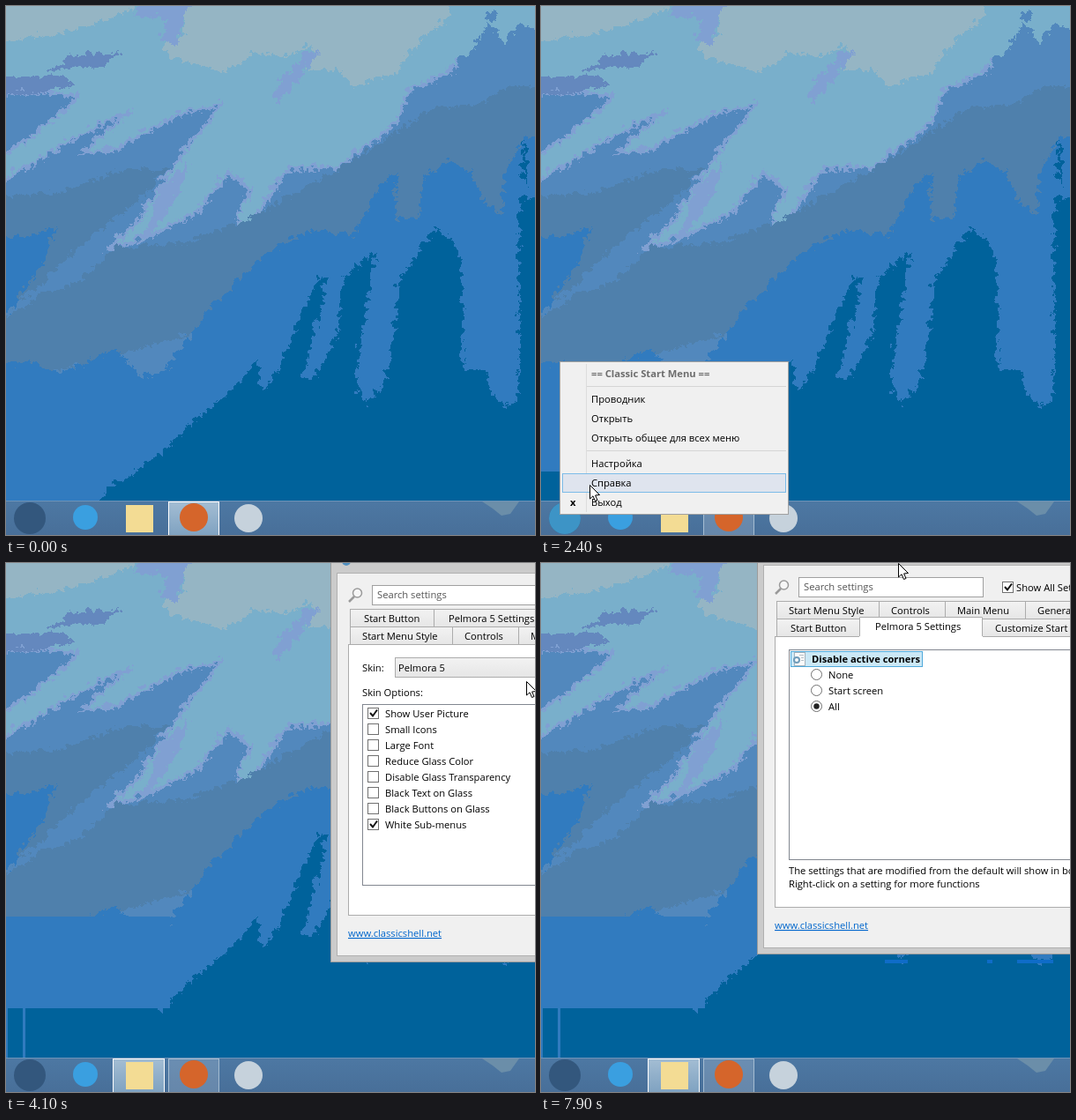
These frames come from a looping animation (600 px wide and 600 px high, 8 s). An HTML page:

```html
<!DOCTYPE html>
<html lang="ru">
<head>
<meta charset="utf-8">
<title>Start menu settings</title>
<style>
  html, body { margin: 0; width: 100%; height: 100%; overflow: hidden; background: #00629b; }
  svg { position: absolute; left: 0; top: 0; width: 600px; height: 600px; }
  #wallpaper { will-change: transform; }
  text { font: 11.2px "Open Sans", "Noto Sans", sans-serif; white-space: pre; }
  .bold { font-weight: bold; }
  .hint { font-size: 12px; font-style: italic; }
</style>
</head>
<body>
<svg id="wallpaper" viewBox="0 0 600 600"></svg>
<svg id="screen" viewBox="0 0 600 600"></svg>
<script>
const LOOP = 8000, STEP = 100;

// Markup helpers
const poly = (fill, points, extra = '') => `<polygon points="${points}" fill="${fill}" ${extra}/>`;
const block = (x, y, w, h, fill, extra = '') => `<rect x="${x}" y="${y}" width="${w}" height="${h}" fill="${fill}" ${extra}/>`;
const box = (x, y, w, h, fill, stroke) => block(x + .5, y + .5, w - 1, h - 1, fill, `stroke="${stroke}"`);
const disc = (x, y, r, fill, extra = '') => `<circle cx="${x}" cy="${y}" r="${r}" fill="${fill}" ${extra}/>`;
const line = (d, stroke, width = 1) => `<path d="${d}" fill="none" stroke="${stroke}" stroke-width="${width}"/>`;
const text = (x, y, s, fill = '#000', cls = '') => `<text x="${x}" y="${y}" fill="${fill}" class="${cls}">${s}</text>`;
const arrow = (x, y, fill, r = 4) => poly(fill, `${x},${y - r} ${x + r},${y} ${x},${y + r}`);
const group = (id, ...parts) => `<g id="${id}">${parts.join('')}</g>`;
const range = (n, make) => Array.from({ length: n }, (_, i) => make(i)).join('');

const MID = '#5288bd', STEEL = '#4f80ac', BRIGHT = '#317bbf', DARK = '#00629b';
const CYAN = '#79afcb', VIOLET = '#80a0d2', GREY = '#95b5c4';

function wallpaper() {
  const fringe = `stroke="${VIOLET}" stroke-width="4"`;
  return `<filter id="rough" filterUnits="userSpaceOnUse" x="-20" y="-20" width="640" height="640" color-interpolation-filters="sRGB">
      <feTurbulence baseFrequency=".09" numOctaves="3" seed="4"/>
      <feDisplacementMap in="SourceGraphic" scale="14" xChannelSelector="R" yChannelSelector="G"/>
    </filter><g filter="url(#rough)" shape-rendering="crispEdges">` + [
    block(-20, -20, 640, 640, MID),
    poly(CYAN, '-20,-20 540,-20 525,40 500,72 455,92 440,130 372,180 318,182 300,205 256,270 262,230 275,205 250,185 215,230 150,262 115,272 150,235 190,175 240,108 190,120 120,160 82,165 138,115 70,150 0,192 -20,195 -20,170 20,150 65,112 78,98 40,95 -20,98', fringe),
    poly(CYAN, '500,-20 620,-20 620,25 580,18 562,40 545,15 520,55 500,60'),
    poly(MID, '540,6 552,2 556,12 545,14'),
    poly('#6488be', '45,70 80,52 128,50 110,64 70,70'),
    poly('#6488be', '-20,80 60,76 76,86 30,96 -20,98'),
    poly(GREY, '-20,-20 185,-20 120,8 60,28 -20,40'),
    poly(GREY, '200,-20 500,-20 500,10 470,30 440,72 390,88 375,68 340,72 345,40 310,55 280,50 245,72 180,55 175,40 200,30'),
    poly(VIOLET, '165,-20 215,-20 200,8 190,40 172,38 178,12 140,8'),
    poly(VIOLET, '300,95 338,48 353,50 330,80 305,108'),
    poly(VIOLET, '150,262 172,205 205,175 190,215 165,250'),
    poly(STEEL, '-20,215 60,208 130,182 182,182 150,215 90,262 30,320 -20,350'),
    poly(STEEL, '-20,360 40,322 80,310 120,272 200,265 270,240 360,190 440,140 480,112 535,108 560,90 620,85 620,260 -20,430'),
    poly(BRIGHT, '-20,260 25,258 54,248 38,290 0,345 -20,350'),
    poly(BRIGHT, '-20,405 30,402 55,415 90,400 120,385 150,418 178,412 225,345 290,278 345,250 390,258 420,200 440,185 438,240 465,235 470,190 500,172 525,185 535,215 558,235 565,180 585,145 620,150 620,640 -20,640'),
    poly(DARK, '95,580 112,545 150,520 175,502 205,470 245,442 283,398 287,432 300,420 330,352 352,303 360,306 357,335 332,418 345,422 372,372 380,303 417,275 410,320 393,415 405,450 428,420 438,360 444,305 462,278 485,250 506,263 515,300 515,408 540,410 548,435 560,453 578,445 580,215 620,210 620,640 95,640'),
    poly(DARK, '582,150 588,160 590,205 584,190'),
  ].join('') + '</g>';
}

// Areas of the desktop repainted after popups and windows close
const repaints = () =>
  group('cornerPaint', block(0, 528, 24, 33, DARK)) +
  group('bottomPaint',
    block(0, 401, 186, 104, BRIGHT), block(0, 505, 172, 56, DARK),
    block(19, 505, 3, 56, BRIGHT), block(0, 505, 2, 56, BRIGHT)) +
  group('edgePaint', ...[[390, 26], [506, 6], [540, 41]].map(([x, w]) => block(x, 450, w, 4, '#0f6cc8')));

const taskbar = () =>
  block(0, 561, 600, 39, 'url(#bar)') + block(0, 561, 600, 1, '#6d93b8') +
  poly('#6b8ea9', '540,562 582,562 572,576 562,578 552,570') +
  group('folderButton', box(121, 562, 59, 39, 'url(#active)', '#fff'), group('folderHot', block(122, 563, 57, 37, '#ffe9a0', 'opacity=".35"'))) +
  group('browserActive', box(184, 562, 58, 39, 'url(#active)', '#fff')) +
  group('browserIdle', box(184, 562, 58, 39, '#ffffff2a', '#a5bdd2')) +
  disc(27, 581, 18, '#33577d') + group('startGlow', disc(27, 581, 18, '#3d94c6')) +
  disc(90, 580, 14, '#3a9fe0') + block(136, 566, 31, 31, '#f3dc94') +
  disc(213, 580, 16, '#d5652b') + disc(275, 581, 16, '#c6d2dc');

function startMenu() {
  const apps = ['Блокнот', 'SumatraPDF', 'Рабочий стол', '7-Zip File Manager', 'Ножницы'];
  const links = [['PelmoraTeal', 171], ['Документы', 200], ['Изображения', 229], ['Музыка', 258],
    ['Игры', 294], ['Недавние документы', 323], ['Этот компьютер', 352], ['Панель управления', 388],
    ['Устройства и принтеры', 417], ['Программы по умолчанию', 446], ['Справка и поддержка', 475], ['Выполнить...', 504]];
  return group('startMenu',
    block(0, 109, 451, 452, '#636463', 'opacity=".96"'),
    line('M0 109.5H450.5V561', '#4b5560'), line('M0 110.5H449.5V559.5H0', '#a4a8aa'),
    box(8, 117, 246, 438, '#fff', '#222'),
    block(9, 512, 244, 42, '#eef2fa'), line('M9 511.5H253', '#c9d3e0'),
    line('M18 482.5H244', '#cfdfee'),
    apps.map((name, i) => text(50, 143 + 38 * i, name) + (i % 2 || !i ? arrow(237, 139 + 38 * i, '#000') : '')).join(''),
    // application icons
    poly('#9ccbe0', '21,125 44,129 40,151 14,148', 'stroke="#6f9db5"'), poly('#d5ebf3', '22,129 41,132 38,147 18,145'),
    line('M22 125L44 129', '#7b8790', 3), poly('#fff', '37,151 47,147 42,153'),
    block(17, 164, 27, 27, '#f3d90c'),
    block(14, 199, 32, 32, '#3d148f'), line('M18.5 205.5H41.5V223.5H18.5ZM23.5 210.5H31.5V215.5H23.5ZM30.5 214.5H38.5V219.5H30.5', '#fff', 2),
    block(15, 238, 30, 30, '#111'),
    `<ellipse cx="28" cy="289" rx="13" ry="10" fill="#eef3f7" stroke="#e2a198"/>`,
    line('M24 276L36 298M36 281L22 295', '#8c9aa6', 3), disc(39, 301, 4, 'none', 'stroke="#5b91c4" stroke-width="2"'), disc(20, 297, 4, 'none', 'stroke="#5b91c4" stroke-width="2"'),
    arrow(20, 496, '#000', 6), text(50, 500, 'Все программы'),
    box(16, 523, 226, 24, '#fff', '#9a9fa6'), text(24, 539, 'Найти программы и файлы', '#6d6d6d', 'hint'),
    disc(231, 533, 4, 'none', 'stroke="#2b62b5" stroke-width="2"'), line('M228 536L223 541', '#2b62b5', 2.5),
    group('caret', block(21, 527, 1, 15, '#000')),
    links.map(([name, y]) => text(266, y, name, '#fff')).join(''),
    arrow(435, 319, '#fff'), arrow(435, 384, '#fff'),
    line('M260 271.5H444M260 365.5H444', '#a9a9a9'),
    box(258, 523, 155, 24, 'none', '#aaa'), line('M392.5 523V547', '#aaa'),
    text(268, 539, 'Завершение работы', '#fff'), arrow(400, 535, '#fff'),
    block(324, 85, 56, 56, '#fff'), box(326, 87, 52, 52, '#444', '#111'),
    '<path d="M334 137V127Q335 117 346 116H358Q369 117 370 127V137Z" fill="#fff"/>', disc(352, 105, 11.5, '#fff', 'stroke="#444" stroke-width="2"'));
}

const contextMenu = () => group('contextMenu',
  box(21, 403, 260, 174, '#f0f0f0', '#a0a0a0'), line('M51.5 406V574', '#dcdcdc'),
  line('M52 431.5H278M52 504.5H278', '#d5d5d5'),
  group('menuHover', box(24, 530, 254, 22, '#dfe4ee', '#7cbce8')),
  text(57, 421, '== Classic Start Menu ==', '#6d6d6d', 'bold'),
  [['Проводник', 450], ['Открыть', 472], ['Открыть общее для всех меню', 494], ['Настройка', 523], ['Справка', 545], ['Выход', 567]]
    .map(([name, y]) => text(57, y, name)).join(''),
  text(33, 567, 'x', '#000', 'bold'));

const check = (x, y, on) => box(x, y, 13, 13, '#fff', '#707070') + (on ? line(`M${x + 3} ${y + 6}l3 3.5l5 -7`, '#111', 2) : '');
const radio = (y, label, on) => disc(435.5, y, 6, '#fff', 'stroke="#707070"') + (on ? disc(435.5, y, 3.2, '#222') : '') + text(449, y + 4.5, label);

function tabRow(id, y, tabs) {
  return group(id, ...tabs.map(([x, w, pad, label]) => box(x, y, w + 1, 21, 'url(#tab)', '#acacac') + text(x + pad, y + 15, label)));
}

function settingsWindow() {
  const outer = [[390, 95, 16, 'Start Button'], [485, 138, 17, 'Pelmora 5 Settings'], [623, 150, 15, 'Customize Start Menu']];
  const inner = [[390, 116, 14, 'Start Menu Style'], [506, 75, 14, 'Controls'], [581, 91, 14, 'Main Menu'], [672, 110, 14, 'General Behavior']];
  const options = ['Show User Picture', 'Small Icons', 'Large Font', 'Reduce Glass Color', 'Disable Glass Transparency',
    'Black Text on Glass', 'Black Buttons on Glass', 'White Sub-menus'];
  return group('settings',
    box(368, -30, 480, 483, '#cbcbcb', '#9c9c9c'), box(375, 11, 466, 435, '#f0f0f0', '#b0b0b0'),
    disc(386, -2, 5, '#4f8fc0'),
    disc(398.5, 34, 5, '#f6f6f6', 'stroke="#9a9a9a" stroke-width="1.5"'), line('M395 38L389 44', '#9a9a9a', 2.5),
    box(415, 25, 210, 23, '#fff', '#a0a0a0'), text(421, 40, 'Search settings', '#555'),
    check(646, 30, true), text(662, 41, 'Show All Settings'),
    box(388, 92, 445, 308, '#fff', '#acacac'),
    tabRow('skinTop', 52, outer) + tabRow('skinBottom', 72, inner),
    group('tabHover', box(485, 52, 139, 21, '#def1fc', '#7eb4ea'), text(502, 67, 'Pelmora 5 Settings')),
    tabRow('cornerTop', 52, inner) + tabRow('cornerBottom', 72, outer),
    group('buttonHover', box(390, 72, 96, 21, '#ddf1fc', '#7eb4ea'), text(406, 87, 'Start Button')),
    group('selectedTab', block(484, 70, 140, 24, '#fff'), line('M484.5 92V70.5H623.5V92', '#acacac'), text(502, 85, 'Pelmora 5 Settings')),
    group('skinPage',
      text(404, 123, 'Skin:'), box(441, 107, 380, 23, 'url(#tab)', '#acacac'), text(445, 123, 'Pelmora 5'),
      text(404, 151, 'Skin Options:'), box(404, 160, 417, 206, '#fff', '#828790'),
      range(8, i => check(410, 164 + 18 * i, i % 7 === 0) + text(430, 175 + 18 * i, options[i]))),
    group('cornerPage',
      box(404, 107, 417, 239, '#fff', '#828790'), box(406, 109, 150, 18, '#cbe8f6', '#4fa9da'),
      box(410, 110, 13, 16, '#fafafa', '#a5b3bd'), disc(413, 119, 3, 'none', 'stroke="#6f9cba" stroke-width="2"'),
      line('M416 113.5H421M418 116.5H421M418 119.5H421', '#b5c0c8'),
      text(430, 122, 'Disable active corners', '#000', 'bold'),
      radio(135.5, 'None'), radio(153.5, 'Start screen'), radio(171.5, 'All', true),
      text(404, 362, 'The settings that are modified from the default will show in bold.'),
      text(404, 377, 'Right-click on a setting for more functions')),
    text(388, 424, 'www.classicshell.net', '#0066cc', '" text-decoration="underline'));
}

const gradient = (id, from, to) => `<linearGradient id="${id}" x2="0" y2="1"><stop stop-color="${from}"/><stop offset="1" stop-color="${to}"/></linearGradient>`;

document.getElementById('wallpaper').innerHTML = wallpaper();
document.getElementById('screen').innerHTML =
  gradient('bar', '#4d78a3', '#486f99') + gradient('active', '#a3bdd3', '#7fa2c1') + gradient('tab', '#f2f2f2', '#e6e6e6') +
  repaints() + taskbar() + startMenu() + contextMenu() + settingsWindow() +
  group('cursor', poly('#fff', '.5,.5 .5,16 4,12.8 6.5,18.5 9,17.5 6.6,12 11.5,11.5', 'stroke="#000"'));

const parts = Object.fromEntries([...document.querySelectorAll('#screen g[id]')].map(g => [g.id, g]));
const show = (id, on) => parts[id].setAttribute('visibility', on ? 'inherit' : 'hidden');
const move = (id, value) => parts[id].setAttribute('transform', value);

// Pointer stops: time, x, y
const pointer = [[400, 349, 280], [1200, 21, 576], [2200, 21, 576], [2400, 55, 543], [2600, 67, 522], [3100, 67, 522],
  [3700, 574, 186], [3800, 574, 186], [4100, 590, 134], [4500, 590, 134], [5300, 568, 70], [6200, 568, 70],
  [6800, 478, 75], [7000, 492, 66], [7100, 492, 66], [7400, 528, 9], [7900, 405, 0]];

function pointerAt(t) {
  const i = pointer.findIndex(stop => stop[0] > t);
  if (i < 0) return pointer[pointer.length - 1].slice(1);
  if (i === 0) return pointer[0].slice(1);
  const [t0, x0, y0] = pointer[i - 1], [t1, x1, y1] = pointer[i];
  const u = (t - t0) / (t1 - t0), e = u * u * (3 - 2 * u);
  return [Math.round(x0 + (x1 - x0) * e), Math.round(y0 + (y1 - y0) * e)];
}

function render(t) {
  const within = (from, to) => t >= from && t < to;
  const [x, y] = pointerAt(t);
  show('cursor', t >= 400);
  move('cursor', `translate(${x} ${y})`);

  show('browserActive', t < 1200);
  show('browserIdle', t >= 1200);
  show('startGlow', within(1100, 2700));
  show('startMenu', within(1400, 2000));
  show('caret', t < 1800 && t >= 1400);

  show('contextMenu', within(2100, 2800));
  parts.contextMenu.setAttribute('opacity', t < 2700 ? 1 : .4);
  show('menuHover', within(2300, 2800));
  move('menuHover', `translate(0 ${y > 552 ? 22 : y > 529 ? 0 : -22})`);
  show('cornerPaint', t >= 2100);
  show('bottomPaint', t >= 2700);
  show('edgePaint', t >= 7500);
  show('folderButton', t >= 2800);
  show('folderHot', t < 3200 && t >= 2800);

  // Window opens by growing, later it is dragged by its title bar
  const [scale, opacity] = { 2800: [.93, .2], 2900: [.965, .6], 3000: [.988, .95] }[t] || [1, 1];
  const dx = t > 7400 ? x - 528 : 0, dy = t > 7400 ? y - 9 : 0;
  show('settings', t >= 2800);
  parts.settings.setAttribute('opacity', opacity);
  move('settings', `translate(${600 + dx} ${150 + dy}) scale(${scale}) translate(-600 -150)`);

  const corners = t >= 5500;
  for (const id of ['skinTop', 'skinBottom']) show(id, !corners);
  for (const id of ['cornerTop', 'cornerBottom', 'selectedTab', 'cornerPage']) show(id, corners);
  show('skinPage', t < 5400);
  show('tabHover', !corners && t >= 4600 && y < 73);
  show('buttonHover', within(6600, 7000) && x < 486);
}

// Hidden children must not show through a hidden parent
for (const id of ['startMenu', 'contextMenu', 'settings', 'folderButton'])
  new MutationObserver(() => {
    parts[id].style.display = parts[id].getAttribute('visibility') === 'hidden' ? 'none' : '';
  }).observe(parts[id], { attributes: true, attributeFilter: ['visibility'] });

const start = performance.now();
let shown = -1;
function tick(now) {
  const t = Math.floor((Math.max(0, now - start) % LOOP) / STEP) * STEP;
  if (t !== shown) render(shown = t);
  requestAnimationFrame(tick);
}
tick(start);
</script>
</body>
</html>
```
